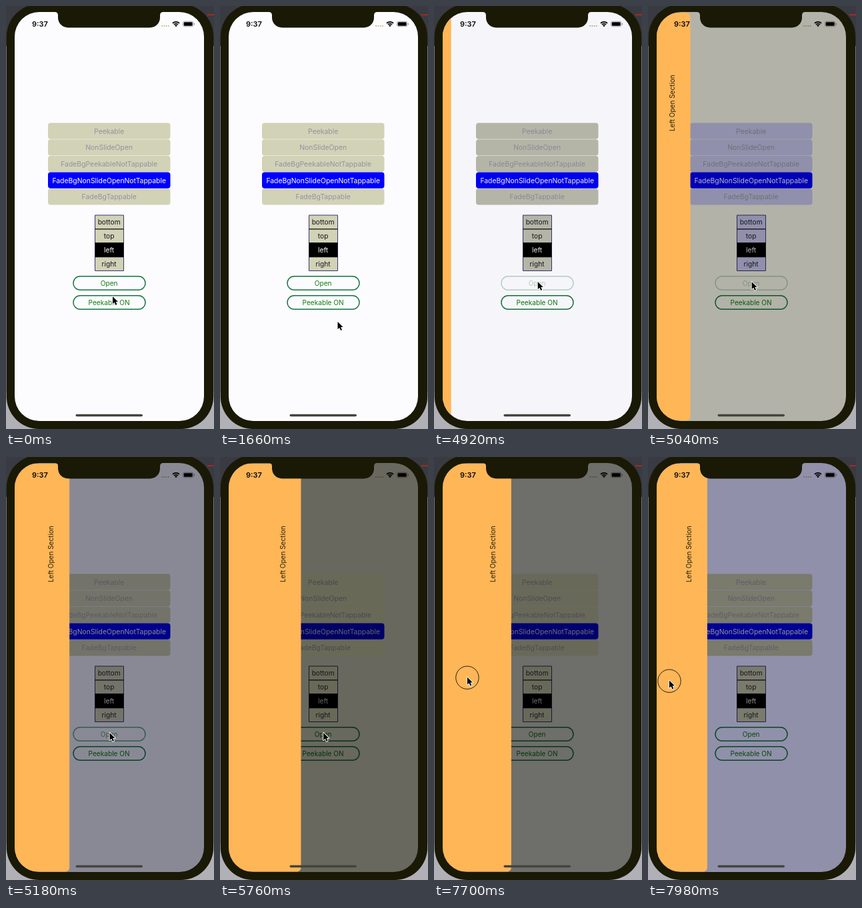
Animation, 312 px wide and 635 px high, one loop 8000 ms. Source, as an HTML page with a canvas:

```html
<!DOCTYPE html>
<html lang="en">
<head>
<meta charset="utf-8">
<title>Drawer demo</title>
<style>
html, body { margin: 0; width: 100%; height: 100%; overflow: hidden; background: #191906; }
canvas { display: block; width: 312px; height: 635px; }
</style>
</head>
<body>
<canvas id="stage"></canvas>
<script>
const W = 312, H = 635, LOOP = 8000;
const canvas = document.getElementById('stage');
const ctx = canvas.getContext('2d');
const ratio = window.devicePixelRatio || 1;
canvas.width = W * ratio;
canvas.height = H * ratio;

const FONT = 'Inter, "Open Sans", sans-serif';
const BEZEL = '#191906';
const LEFT = 13, OPEN_WIDTH = 109, FADE = 0.6;
const OPTIONS = ['Peekable', 'NonSlideOpen', 'FadeBgPeekableNotTappable',
  'FadeBgNonSlideOpenNotTappable', 'FadeBgTappable'];
const SIDES = ['bottom', 'top', 'left', 'right'];

// Grey level -> tinted display colour
const TONES = [
  [0, 0, 0, 0], [84, 105, 105, 88], [102, 104, 104, 93], [110, 109, 109, 106],
  [122, 121, 121, 107], [148, 144, 144, 171], [152, 144, 144, 172],
  [184, 178, 178, 168], [196, 180, 180, 167], [211, 210, 210, 183],
  [238, 247, 247, 252], [255, 252, 252, 255]
];

// Pointer: [time, x, y]
const POINTER = [
  [0, 160, 436], [500, 162, 440], [1150, 178, 478], [1500, 178, 478],
  [2500, 157, 422], [3300, 157, 422], [4200, 156, 414], [6300, 155, 414],
  [7350, 53, 330], [7560, 53, 330], [7700, 50, 330.5], [7980, 32, 335.5], [8000, 31, 336]
];
// Drawer while dragged: [time, width]
const DRAG = [[7600, 109], [7700, 103], [7980, 76], [8000, 74]];
const PRESS = [[4720, 1], [4870, 0.3], [5060, 0.3], [5300, 1]];

const clamp = (v) => Math.min(1, Math.max(0, v));
const smooth = (p) => p * p * (3 - 2 * p);
const linear = (p) => p;

function track(keys, t, ease) {
  if (t <= keys[0][0]) return keys[0].slice(1);
  for (let i = 1; i < keys.length; i++) {
    const a = keys[i - 1], b = keys[i];
    if (t <= b[0]) {
      const p = ease((t - a[0]) / (b[0] - a[0]));
      return a.slice(1).map((v, k) => v + (b[k + 1] - v) * p);
    }
  }
  return keys[keys.length - 1].slice(1);
}

function tone(level) {
  return 'rgb(' + track(TONES, level, linear).map(Math.round).join() + ')';
}

function shade(rgb, light) {
  return 'rgb(' + rgb.map((v) => Math.round(v * light)).join() + ')';
}

function drawerWidth(t) {
  if (t > 7600) return track(DRAG, t, linear)[0];
  const s = Math.max(0, t - 4850) / 1000 * 8.2;
  return OPEN_WIDTH * (1 - (1 + s) * Math.exp(-s));
}

function box(x, y, w, h, r, fill, stroke, line) {
  ctx.beginPath();
  ctx.roundRect(x, y, w, h, r);
  if (fill) { ctx.fillStyle = fill; ctx.fill(); }
  if (stroke) { ctx.strokeStyle = stroke; ctx.lineWidth = line; ctx.stroke(); }
}

function label(text, x, y, color, size = 10.4, weight = 400) {
  ctx.font = `${weight} ${size}px ${FONT}`;
  ctx.textAlign = 'center';
  ctx.textBaseline = 'alphabetic';
  ctx.fillStyle = color;
  ctx.fillText(text, x, y + size * 0.36);
}

function screenPath() {
  const r = 37;
  ctx.beginPath();
  ctx.moveTo(50, 9);
  ctx.lineTo(73, 9);
  ctx.quadraticCurveTo(78, 9, 78, 14);
  ctx.arcTo(78, 32.5, 94, 32.5, 15);
  ctx.arcTo(231, 32.5, 231, 17, 15);
  ctx.lineTo(231, 14);
  ctx.quadraticCurveTo(231, 9, 236, 9);
  ctx.arcTo(297, 9, 297, 60, r);
  ctx.arcTo(297, 623, 250, 623, r);
  ctx.arcTo(13, 623, 13, 580, r);
  ctx.arcTo(13, 9, 50, 9, r);
  ctx.closePath();
}

function drawPhone() {
  ctx.fillStyle = '#3a3a42';
  ctx.fillRect(0, 0, W, 60);
  ctx.fillStyle = '#8e8ea6';
  ctx.fillRect(0, 60, W, 520);
  ctx.fillStyle = '#b0b0b6';
  ctx.fillRect(0, 580, W, 55);
  ctx.fillStyle = '#c02818';
  ctx.fillRect(302, 12.5, 10, 1.5);
  box(0.8, -3, 310.4, 638, 49, BEZEL);
}

function drawOptions(light) {
  OPTIONS.forEach((name, i) => {
    const active = i === 3;
    const y = 175.5 + i * 24.7;
    box(63, y, 183.5, 24.2, 4, active ? shade([0, 0, 255], light) : tone(211 * light));
    const ink = active ? shade([255, 255, 255], light) : shade([146, 146, 160], 0.15 + light * 0.85);
    label(name, 154.7, y + 12.4, ink);
  });
}

function drawSides(light) {
  const edge = shade([56, 56, 112], light);
  box(133.5, 314, 43, 83.5, 0, tone(211 * light), edge, 1);
  SIDES.forEach((name, i) => {
    const y = 314 + i * 20.9;
    const active = i === 2;
    if (active) box(133.5, y - 0.5, 43, 21.5, 0, '#000');
    if (i) box(133.5, y - 0.6, 43, 1.2, 0, '#08080c');
    label(name, 154.6, y + 10.4, active ? shade([255, 255, 255], light) : '#14141c', 10.2);
  });
}

function drawButton(text, y, light, alpha) {
  ctx.globalAlpha = alpha;
  box(101, y, 108, 20.5, 10.25, null, shade([20, 116, 60], light), 1.4);
  label(text, 154.6, y + 10.2, shade([16, 124, 16], light), 10.1);
  ctx.globalAlpha = 1;
}

function drawDrawer(width) {
  if (width < 0.2) return;
  const edge = LEFT + width;
  box(LEFT - 20, 10, width + 20, 612.5, 6, '#ffb657');
  ctx.save();
  ctx.translate(edge - 27.5, 145.7);
  ctx.rotate(-Math.PI / 2);
  label('Left Open Section', 0, 0, '#24200c', 10);
  ctx.restore();
}

function drawStatus(light) {
  label('9:37', 51, 27, '#0a0a0a', 11, 600);
  ctx.fillStyle = shade([190, 190, 130], light);
  for (let i = 0; i < 4; i++) ctx.fillRect(233.3 + i * 3.2, 29, 1.8, 1.8);

  ctx.strokeStyle = '#000';
  ctx.lineWidth = 1.7;
  for (const r of [4.4, 7.2]) {
    ctx.beginPath();
    ctx.arc(255, 31, r, -Math.PI * 0.75, -Math.PI * 0.25);
    ctx.stroke();
  }
  ctx.beginPath();
  ctx.moveTo(255, 31.2);
  ctx.arc(255, 31.2, 2.7, -Math.PI * 0.75, -Math.PI * 0.25);
  ctx.fillStyle = '#000';
  ctx.fill();

  box(265.5, 23.2, 15.4, 7.6, 2.2, null, 'rgba(0,0,0,.4)', 0.8);
  box(266.7, 24.3, 13, 5.4, 1.3, '#000');
  box(281.9, 25.6, 1, 2.8, 0.5, 'rgba(0,0,0,.45)');
}

function drawPointer(x, y) {
  const shape = [[0, 0], [0, 11.2], [2.6, 8.8], [4.5, 13], [6.4, 12.1], [4.6, 8], [8, 8]];
  ctx.beginPath();
  shape.forEach(([dx, dy]) => ctx.lineTo(x + dx, y + dy));
  ctx.closePath();
  ctx.lineJoin = 'round';
  ctx.strokeStyle = '#fff';
  ctx.lineWidth = 1.8;
  ctx.stroke();
  ctx.fillStyle = '#000';
  ctx.fill();
}

function drawTouch(x, y) {
  ctx.beginPath();
  ctx.arc(x, y, 17.2, 0, Math.PI * 2);
  ctx.strokeStyle = '#20201c';
  ctx.lineWidth = 1;
  ctx.stroke();
}

function draw(t) {
  const width = drawerWidth(t);
  const light = 1 - FADE * clamp(width / OPEN_WIDTH);
  const [x, y] = track(POINTER, t, t > 7560 ? linear : smooth);

  ctx.setTransform(ratio, 0, 0, ratio, 0, 0);
  drawPhone();
  ctx.save();
  screenPath();
  ctx.clip();
  ctx.fillStyle = tone(255 * light);
  ctx.fillRect(0, 0, W, H);
  drawOptions(light);
  drawSides(light);
  drawButton('Open', 405.8, light, track(PRESS, t, linear)[0]);
  drawButton('Peekable ON', 434.8, light, 1);
  drawDrawer(width);
  drawStatus(light);
  box(104.5, 612.7, 100.5, 3.6, 1.8, '#44443f');
  ctx.restore();
  if (t >= 7540) drawTouch(x, y + 0.7);
  drawPointer(x, y);
}

const start = performance.now();
function tick() {
  draw((performance.now() - start) % LOOP);
  requestAnimationFrame(tick);
}
tick();
</script>
</body>
</html>
```
